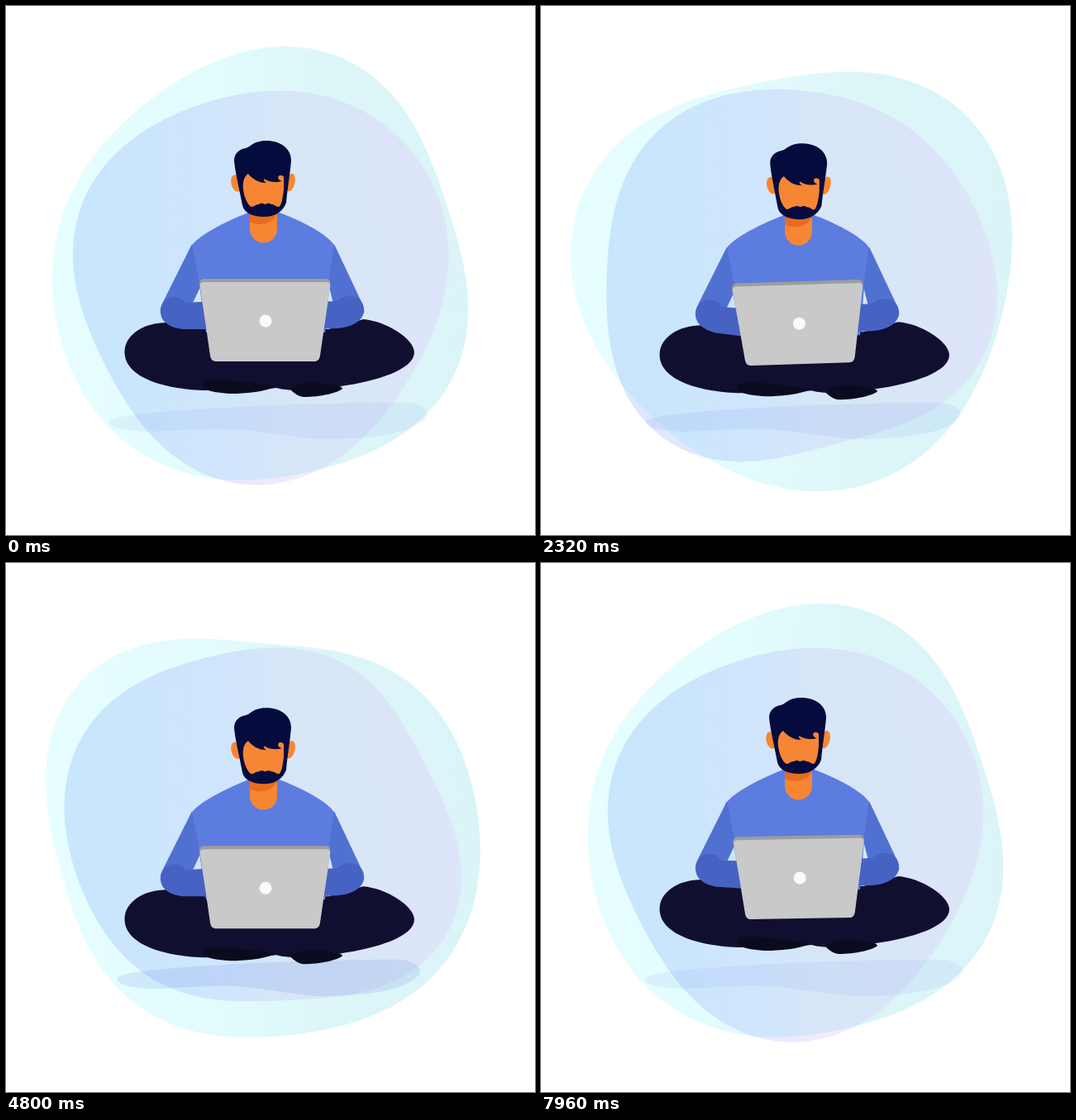
These frames come from a looping animation (640x640 px, 8 s). An HTML page:

```html
<!DOCTYPE html>
<html lang="en">
<head>
<meta charset="utf-8">
<title>Working on a laptop</title>
<style>
html, body { margin: 0; width: 100%; height: 100%; overflow: hidden; background: #fff; }
svg { display: block; width: 100%; height: 100%; }
</style>
</head>
<body>
<svg viewBox="0 0 640 640">
  <defs>
    <linearGradient id="mint" gradientUnits="userSpaceOnUse" x1="40" x2="580">
      <stop offset="0" stop-color="#e6feff"/>
      <stop offset=".4" stop-color="#e2fbfc"/>
      <stop offset=".65" stop-color="#dcf6f8"/>
      <stop offset="1" stop-color="#daf4f8"/>
    </linearGradient>
    <linearGradient id="lilac" gradientUnits="userSpaceOnUse" x1="80" x2="540">
      <stop offset=".1" stop-color="#759ff7"/>
      <stop offset=".4" stop-color="#9aa6fc"/>
      <stop offset=".58" stop-color="#c3b2f0"/>
      <stop offset="1" stop-color="#e2bef8"/>
    </linearGradient>
    <clipPath id="inside"><path id="clip"/></clipPath>
  </defs>

  <path id="outer" fill="url(#mint)"/>
  <path id="inner" fill="url(#lilac)" opacity=".25"/>
  <path d="M430 115L497 490H640V115Z" fill="#e6d2fa" opacity=".12" clip-path="url(#inside)"/>
  <path id="shadow" fill="#4068d8" d="M125 503C128 494 200 489 320 483C380 481 440 480 478 479.500C500 480 510 486 510 494C508 504 490 512 468 517C440 523 405 524 380 524C335 521 300 512 262 511.500C220 512 195 515 170 515C145 514 126 511 125 503Z"/>

  <g id="man">
    <path fill="#110f30" d="M143.500 418C144 398 166 383 195 383L240 391H390L432 379C460 381 494 403 494 419C494 440 448 454 405 460C380 464 350 468 327 462C300 466 270 465 238 465C190 463 143 449 143.500 418Z"/>
    <g fill="#0b0b20">
      <path d="M238 460C234 452 250 451 270 453C290 455 310 457 326 461C310 467 290 469 272 469C255 468 240 466 238 460Z"/>
      <path d="M345 465C350 456 365 455 380 456C392 458 407 459 407 463C402 468 380 473 360 473C352 472 349 468 345 465Z"/>
    </g>
    <path fill="#5c7ce0" d="M224.500 290C232 278 265 261 293 250H331C360 261 390 277 397.500 290L391 338L386 395H242L234 338Z"/>
    <g fill="#5071d2">
      <path d="M225 288L189 360Q186 366 187 372L220 372L235 340Z"/>
      <path d="M397 288L431 360Q434 366 433 372L398 368L390 336Z"/>
    </g>
    <g fill="#4663c4">
      <path id="left" d="M187 370C187 360 193 352 204 352C211 352 214 355 217 359L252 357V391H215C200 390 187 383 187 370Z"/>
      <path id="right" d="M433 368C433 358 427 351 416 351C408 351 404 354 401 357L372 358V391L400 390C418 389 433 381 433 368Z"/>
    </g>
    <path fill="#f68634" d="M295 249H328V270a16.500 16.500 0 0 1-33 0Z"/>
    <path fill="#e86c1d" d="M295 249H328V251C326 258 318 264 307 264C301 264 297 262 295 261Z"/>
    <g id="head">
      <g fill="#f68634">
        <ellipse cx="278.500" cy="214.500" rx="6" ry="10.500" transform="rotate(-14 278.500 214.500)"/>
        <ellipse cx="344" cy="213.500" rx="5.500" ry="11" transform="rotate(14 344 213.500)"/>
      </g>
      <path fill="#050b3d" d="M276 187C276 178 283 173 290 172C297 170 299 163 315 163C333 163 345 173 345 187C344 200 340 225 339 238C335 249 325 255 312 255C298 255 288 250 286 241C282 220 277 200 276 187Z"/>
      <path fill="#f68634" d="M293 203C298 209 305 214 315 214C312 212 312 211 312 209C318 213 326 214 334 212C330 211 328 208 330 205.500C332 204 335 205 336 207V222C335 232 333 242 330 243C326 243 326 240 321 240C318 238 316 239 313.500 240C311 239 309 238 306 240C301 240 301 243 297 243C292 241 288 230 287 222C286 213 288 206 293 203Z"/>
    </g>
    <g id="laptop">
      <path fill="#9d9d9d" d="M234 338C233 333 236 330 240 330H387C391 330 393 333 392 338L386 380H241Z"/>
      <path fill="#c9c9c9" d="M235 340C234 336 236 334 240 334H387C391 334 393 336 392 340L380 423C379 428 377 430 373 430H255C250 430 248 428 247 423Z"/>
      <circle cx="314" cy="381" r="7.500" fill="#fafafa"/>
    </g>
  </g>
</svg>
<script>
const LOOP = 8000, CX = 310, CY = 320, STEPS = 120;
const { sin, cos, PI, max } = Math;
const set = (id, name, value) => document.getElementById(id).setAttribute(name, value);
const spin = (id, angle, x, y) => set(id, 'transform', `rotate(${angle} ${x} ${y})`);

// Radius at angle a (clockwise from the right) and loop phase w:
// ripples with one to four crests, some still, some travelling round.
const stretch = (a, w) =>
  4.4 * cos(2 * a - 0.6) + 8.2 * cos(2 * a - w + 2.7) + 2.9 * cos(2 * a + w + 2.35);

const outer = (a, w) => 257.3 + 2.6 * cos(w - 2.06) + stretch(a, w)
  + 3.7 * cos(a - 1.54) + 3.4 * cos(a - w + 1.57) + 2.8 * cos(a + w + 2.29) + 2.6 * cos(a - 2 * w - 1.26)
  + 3.8 * cos(3 * a + 2.43) + 9.7 * cos(3 * a - w - 2.01) + 3.2 * cos(3 * a + w - 1.36) + 2.8 * cos(3 * a - 2 * w + 0.17)
  + (4.2 * cos(w - 0.8) - 4) * cos(4 * a) + (2.8 + 3.1 * cos(2 * w)) * sin(4 * a);

const inner = (a, w) => 229.8 + 3.3 * sin(w) + stretch(a, w)
  + 8.2 * cos(a - 1.84) + 3.6 * cos(a - w - 1.43) + 2.5 * cos(a + w - 0.56) + 2.2 * cos(a - 2 * w + 1.99)
  + 8.8 * cos(3 * a - w + 1.36) + 2.3 * cos(3 * a + w + 2.07) + (1.5 + 3.9 * cos(2 * w - 2.64)) * cos(3 * a)
  + (2.5 * cos(w) + 2.6 * cos(2 * w) - 2.6) * cos(4 * a) + (4.7 - 3 * cos(w - 0.5)) * sin(4 * a);

function blob(radius, w) {
  const pts = Array.from({ length: STEPS }, (_, i) => {
    const a = i * 2 * PI / STEPS, r = radius(a, w);
    return [CX + r * cos(a), CY + r * sin(a)];
  });
  return 'M' + pts.join('L') + 'Z';
}

function draw(now) {
  const t = max(0, now) % LOOP;
  const w = t / LOOP * 2 * PI;
  const bob = (1 - cos(4 * w)) / 2;
  const type = sin(10 * w);
  const nod = t % 4000 > 2000 ? bob : 0;

  const shape = blob(inner, w);
  set('outer', 'd', blob(outer, w));
  set('inner', 'd', shape);
  set('clip', 'd', shape);

  set('shadow', 'transform', `translate(317.5 0) scale(${1 - 0.053 * bob} 1) translate(-317.5 0)`);
  set('shadow', 'opacity', 0.07 + 0.07 * bob);
  set('man', 'transform', `translate(0 ${13.6 * bob})`);
  spin('head', 3.4 * nod, 312, 270);
  spin('laptop', 3.1 * type, 313, 430);
  spin('left', 13 * max(0, -type), 204, 370);
  spin('right', -13 * max(0, type), 416, 370);
  requestAnimationFrame(draw);
}
draw(performance.now());
</script>
</body>
</html>
```
